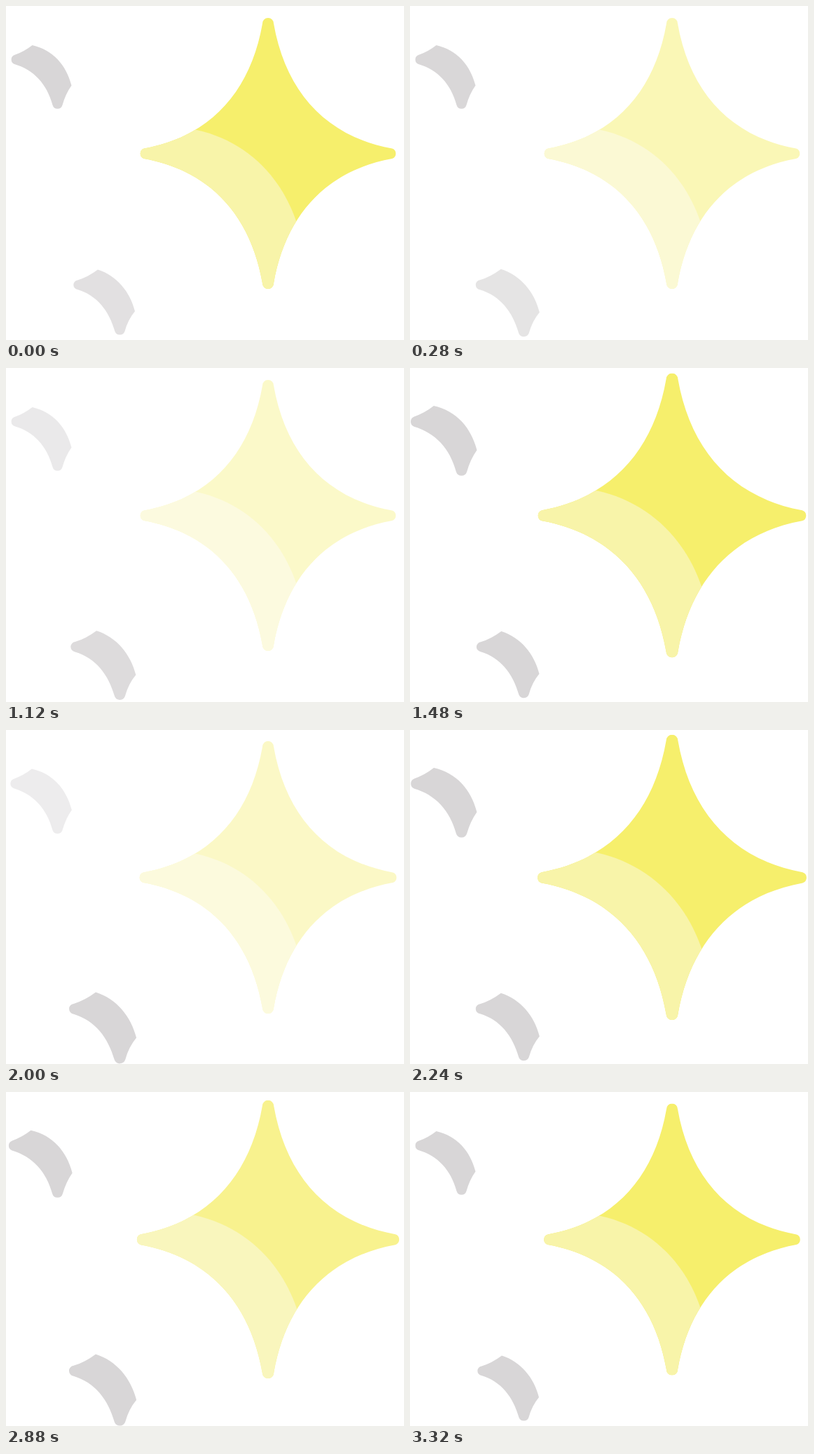
An HTML page for the animation above (3.36 s loop, 568 px wide and 477 px high).

```html
<!DOCTYPE html>
<html lang="en">
<head>
<meta charset="utf-8">
<title>Sparkles</title>
<style>
  html, body { margin: 0; width: 100%; height: 100%; overflow: hidden; background: #fff; }
  svg { display: block; width: 568px; height: 477px; }
</style>
</head>
<body>
<svg viewBox="0 0 568 477">
  <clipPath id="star">
    <path d="M197 203.5C291 186.5 349 122.5 366 25A8 8 0 0 1 382 25C399 122.5 457 186.5 551 203.5A7.6 7.6 0 0 1 551 218C457 235 399 299 382 396A8 8 0 0 1 366 396C349 299 291 235 197 218A7.6 7.6 0 0 1 197 203.5Z"/>
  </clipPath>
  <g id="big">
    <g clip-path="url(#star)">
      <path fill="#f6ef6c" d="M150 0H568V477H150Z"/>
      <path fill="#f8f4a9" d="M150 177H272C340 192 391 240 414 307V477H150Z"/>
    </g>
  </g>
  <path id="upper" fill="#d8d6d7" d="M12 70Q25.5 65.5 37.5 56C67 62.5 86 84.5 93.5 113.5Q85 125.5 80.5 141.5A7.3 7.3 0 0 1 66.5 141.5C58.5 111.5 39.5 91 12 83A7 7 0 0 1 12 70Z"/>
  <path id="lower" fill="#d8d6d7" d="M102.3 391.5Q117 387 131 376.5C158 385 177 408 184 436Q174 448 169.5 464.5A7.5 7.5 0 0 1 155.5 465C147 435 130 413.5 102.3 405A6.8 6.8 0 0 1 102.3 391.5Z"/>
</svg>
<script>
const LOOP = 3360, STEP = 40, CYCLES = 4;

// "first" is the time of the first swell, "period" the gap to the next, in ms.
const stars = [
  { id: 'big', x: 374, y: 210.5, grow: 0.053, first: 620, period: 800 },
  { id: 'upper', x: 73.5, y: 76, grow: 0.1, first: 740, period: 730, hold: [2360, 2920] },
  { id: 'lower', x: 162, y: 398, grow: 0.1, first: 440, period: 800 }
];

const ease = u => (1 - Math.cos(Math.PI * u)) / 2;

function bump(t, from, peak, to) {
  if (t <= from || t >= to) return 0;
  return ease(t < peak ? (t - from) / (peak - from) : (to - t) / (to - peak));
}

// Every cycle dims the star, then swells it; times are relative to the swell.
const swell = t => bump(t, -280, 0, 350);
const dim = t => 0.68 * bump(t, -500, -260, -60);

function draw(now) {
  const frame = Math.floor(now % LOOP / STEP) * STEP;
  const time = frame < 160 ? STEP : frame; // the opening pose rests
  for (const { id, x, y, grow, first, period, hold } of stars) {
    const t = hold && time > hold[0] && time <= hold[1] ? hold[0] : time;
    const cycle = Math.round((t - first + 180) / period);
    const peak = first + period * Math.min(Math.max(cycle, 0), CYCLES - 1);
    const scale = 1 + grow * Math.max(swell(t - peak), peak > first ? swell(t - peak + period) : 0);
    const el = document.getElementById(id);
    el.setAttribute('transform', `translate(${x} ${y}) scale(${scale}) translate(${-x} ${-y})`);
    el.setAttribute('opacity', 1 - dim(t - peak));
  }
}

const begin = performance.now();
function tick() {
  draw(performance.now() - begin);
  requestAnimationFrame(tick);
}
tick();
</script>
</body>
</html>
```
